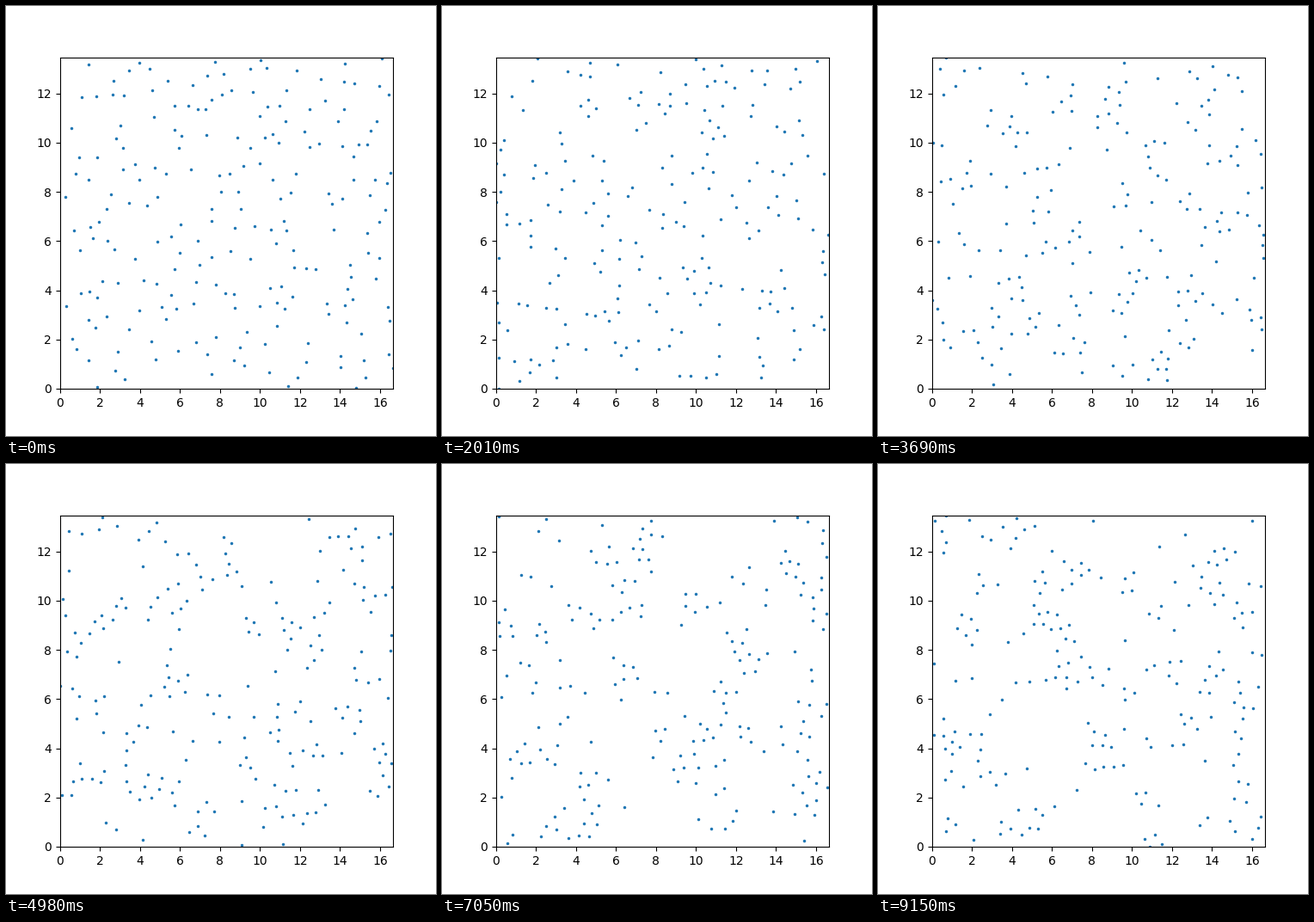
Write a matplotlib script that moves like this. It is 500x500 px and loops after 9.18 s.

```python
import numpy as np
import matplotlib.pyplot as plt
from matplotlib.animation import FuncAnimation

FRAMES, INTERVAL, WARMUP = 306, 30, 24
COLS, ROWS, GAP = 15, 14, 1.11
BOX = np.array([COLS * GAP, ROWS * GAP * np.sqrt(3) / 2])
N = COLS * ROWS
SIGMA, CUTOFF, TEMP = 0.42, 1.1, 0.65
SUBSTEPS = 6
DT = 0.025 / SUBSTEPS
I, J = np.triu_indices(N, 1)
rng = np.random.default_rng(7)


def start():
    """Triangular lattice, each site shifted at random, thermal velocities."""
    row, col = np.divmod(np.arange(N), COLS)
    sites = np.column_stack([(col + 0.25 + 0.5 * (row % 2)) * GAP,
                             (row + 0.5) * BOX[1] / ROWS])
    radius = 0.4 * np.sqrt(rng.random(N))
    angle = 2 * np.pi * rng.random(N)
    shift = radius[:, None] * np.column_stack([np.cos(angle), np.sin(angle)])
    return (sites + shift) % BOX, rescale(rng.normal(size=(N, 2)))


def rescale(vel):
    vel = vel - vel.mean(axis=0)
    return vel * np.sqrt(2 * TEMP / (vel ** 2).sum(axis=1).mean())


def separation(pos, i, j):
    d = pos[i] - pos[j]
    return d - BOX * np.round(d / BOX)


def near_pairs(pos):
    d = separation(pos, I, J)
    close = (d ** 2).sum(axis=1) < (CUTOFF + 0.3) ** 2
    return I[close], J[close]


def forces(pos, i, j):
    """Lennard-Jones pair forces with a capped core."""
    d = separation(pos, i, j)
    r2 = (d ** 2).sum(axis=1)
    s6 = (SIGMA ** 2 / np.maximum(r2, (0.8 * SIGMA) ** 2)) ** 3
    mag = 24 * (2 * s6 ** 2 - s6) / np.maximum(r2, 0.01)
    f = d * np.where(r2 < CUTOFF ** 2, mag, 0)[:, None]
    return np.column_stack([np.bincount(i, f[:, k], N) - np.bincount(j, f[:, k], N)
                            for k in range(2)])


def advance(pos, vel):
    """Velocity Verlet over one frame, then back to the set temperature."""
    pairs = near_pairs(pos)
    acc = forces(pos, *pairs)
    for _ in range(SUBSTEPS):
        vel = vel + 0.5 * DT * acc
        pos = (pos + DT * vel) % BOX
        acc = forces(pos, *pairs)
        vel = vel + 0.5 * DT * acc
    return pos, rescale(vel)


def simulate():
    pos, vel = start()
    for _ in range(WARMUP):
        pos, vel = advance(pos, vel)
    path = np.empty((FRAMES, N, 2))
    for n in range(FRAMES):
        path[n] = pos
        pos, vel = advance(pos, vel)
    return path


path = simulate()

fig, ax = plt.subplots(figsize=(5, 5), dpi=100)
ax.set_xlim(0, BOX[0])
ax.set_ylim(0, BOX[1])
dots, = ax.plot(*path[0].T, ".", color="C0", markersize=3)


def update(n):
    dots.set_data(*path[n].T)
    return dots,


anim = FuncAnimation(fig, update, frames=FRAMES, interval=INTERVAL,
                     repeat=True, repeat_delay=0)
plt.show()
```
